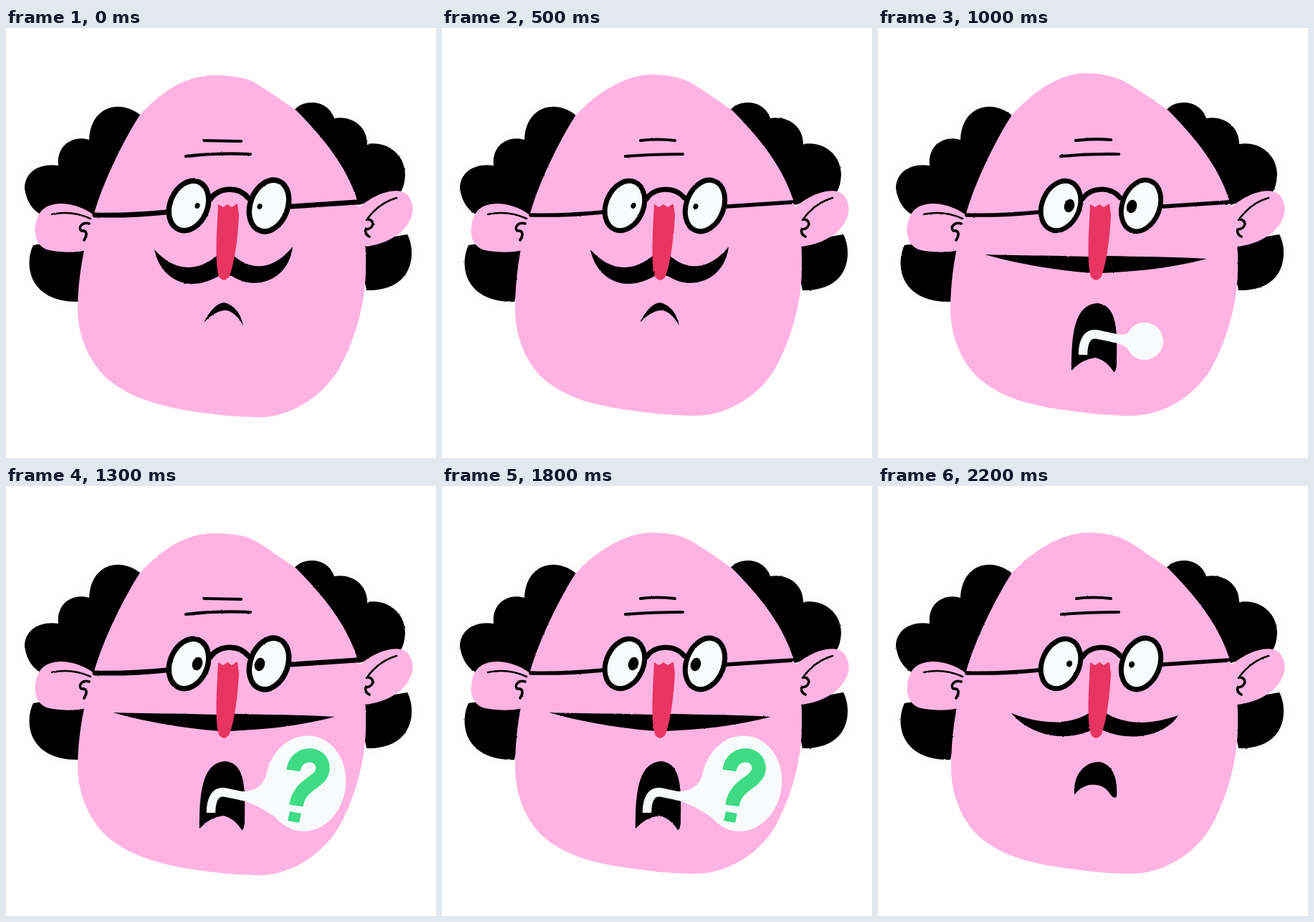
An HTML page for the animation above (2300 ms loop, 600 by 600 pixels).

```html
<!DOCTYPE html>
<html lang="en">
<head>
<meta charset="utf-8">
<title>Puzzled man</title>
<style>
  html, body { margin: 0; width: 100%; height: 100%; overflow: hidden; background: #fff; }
  svg { display: block; width: 100%; height: 100%; }
  .skin { fill: #ffb3e3; }
  .line { fill: none; stroke: #000; stroke-linecap: round; stroke-linejoin: round; }
  .hair { stroke: #fdfdfd; stroke-width: 16; paint-order: stroke; }
  .white { fill: #f8fbfb; }
</style>
</head>
<body>
<svg viewBox="0 0 600 600">
  <defs>
    <filter id="crayon" filterUnits="userSpaceOnUse" x="0" y="0" width="600" height="600" color-interpolation-filters="sRGB">
      <feTurbulence id="grain" type="fractalNoise" baseFrequency=".25" numOctaves="2"/>
      <feColorMatrix values="1 0 0 0 0  0 1 0 0 0  0 0 1 0 0  0 0 0 0 1" result="noise"/>
      <feDisplacementMap in="SourceGraphic" in2="noise" scale="1.8" xChannelSelector="R" yChannelSelector="G"/>
    </filter>
  </defs>
  <g filter="url(#crayon)">
    <g id="hair">
      <path class="hair" d="M187 121C160 99 118 108 116 156C94 149 70 163 73 192C48 188 26 200 26 224Q30 250 48 260Q85 240 125 264L200 200Z"/>
      <path class="hair" d="M38 303C25 330 31 383 102 382L125 290Z"/>
    </g>
    <path class="hair" d="M402 115C415 98 450 100 458 126C480 122 504 135 504 162C530 157 557 175 557 205Q556 222 550 230L492 247L400 180Z"/>
    <path class="hair" d="M560 288C572 310 572 367 503 366L490 300Z"/>
    <path id="head" class="skin"/>
    <path class="skin" d="M124 262C95 240 55 239 45 262C35 285 42 306 60 310C80 314 100 313 113 310Z"/>
    <path class="skin" d="M492 251C515 230 550 219 562 235C573 252 567 270 550 286C535 297 520 303 500 305Z"/>
    <path class="line" stroke-width="2.6" d="M64 260Q92 254 118 266M503 268Q520 244 545 237"/>
    <path class="line" stroke-width="3.6" d="M116 273C107 270 100 278 105 283C113 282 114 288 109 296M505 267C515 268 514 280 502 281Q500 287 507 291"/>
    <path id="wrinkles" class="line" stroke-width="4.2"/>
    <g id="glasses" class="line">
      <ellipse class="white" cx="255" cy="248" rx="26" ry="36" transform="rotate(23 255 248)"/>
      <ellipse class="white" cx="367" cy="248" rx="26" ry="37" transform="rotate(21 367 248)"/>
      <path d="M285 239C296 222 324 220 338 237"/>
    </g>
    <path id="temples" class="line" d="M124 261Q175 262 224 257M398 249L489 243"/>
    <ellipse id="pupilL" cx="267" cy="248" transform="rotate(18 267 248)"/>
    <ellipse id="pupilR" cx="354" cy="249" transform="rotate(18 354 249)"/>
    <path id="moustache"/>
    <path id="mouth"/>
    <path fill="#e83562" d="M296 246L303 250L309 246L315 250L323 245L325 262C323 300 318 330 312 346Q305 357 297 347C291 325 294 290 296 246Z"/>
  </g>
  <g id="bubble">
    <path fill="none" stroke="#f8fbfb" stroke-width="12.5" d="M286 456C286 434 294 426 305 427.500L332 433"/>
    <path id="tail" class="white"/>
    <ellipse id="blob" class="white"/>
    <g id="question">
      <path fill="none" stroke="#3fdb84" stroke-width="19.5" d="M401 397C405 368 443 370 442 395C440 415 409 415 405 446"/>
      <path fill="#3fdb84" d="M396 454L412 457L409 470L393 467Z"/>
    </g>
  </g>
</svg>
<script>
const STEP = 100, STEPS = 23;
// One letter per step: line boil, expression and bubble size.
const BOIL   = "ACBACBACBACBBACBACBACBB";
const MOOD   = "cccccccchoooooooooooooh";
const BUBBLE = "---------nsmllllllllms-";

const boils = {
  A: { top: [290, 66], left: 100, base: 543, pen: 7.5, arm: 6.8, hair: 0,
       wrinkles: "M276 157L328 158M251 179Q295 174 341 176" },
  B: { top: [295, 65], left: 102, base: 541, pen: 7, arm: 5.4, hair: -1,
       wrinkles: "M277 157Q300 154 325 157M256 179Q295 176 336 176" },
  C: { top: [291, 63], left: 101, base: 541, pen: 6.8, arm: 5.4, hair: -1,
       wrinkles: "M276 157Q300 154 325 156M255 179Q295 175 336 176" }
};

const moods = {
  c: { pupil: [3.5, 4],
       moustache: "M207 309C215 350 255 373 300 344L315 346C350 369 395 350 400 305C380 330 350 345 318 318L294 318C260 345 230 335 207 309Z",
       mouth: "M276 411Q289 385 304 383Q325 388 331 415Q318 393 304 394Q290 396 276 411Z" },
  h: { pupil: [4, 4.6],
       moustache: "M186 317C210 345 255 360 300 340L312 340C350 358 400 350 419 320C385 332 350 335 320 318L294 317C265 335 225 332 186 317Z",
       mouth: "M274 431C272 400 290 385 308 385C328 387 335 410 333 433Q330 438 324 430Q315 415 295 417Q282 420 274 431Z" },
  o: { pupil: [7, 9.5],
       moustache: "M149 316C190 328 245 338 298 342L312 342C360 340 410 335 459 322C410 319 360 319 320 318L294 319C245 317 200 318 149 316Z",
       mouth: "M270 478C270 430 273 385 307 384C335 388 334 425 333 470Q332 480 329 480Q318 463 303 460Q285 462 270 478Z" }
};

const bubbles = {
  n: { cx: 330, cy: 434, rx: 7, ry: 6, mark: 0 },
  s: { cx: 372, cy: 437, rx: 26, ry: 26, mark: 0 },
  m: { cx: 405, cy: 424, rx: 47, ry: 48, mark: .69, at: [403.5, 428] },
  l: { cx: 418, cy: 415, rx: 56, ry: 67, mark: 1, at: [422, 418] }
};

const $ = id => document.getElementById(id);
const set = (id, attrs) => {
  for (const name in attrs) $(id).setAttribute(name, attrs[name]);
};

function headPath({ top: [x, y], left, base }) {
  return `M${x} ${y}C${x - 40} ${y} 216 90 187 121C165 155 135 215 122 262` +
    `C108 305 ${left} 350 ${left} 395C${left + 1} 430 115 465 142 490` +
    `C167 511 200 525 260 ${base - 8}C300 ${base - 2} 330 ${base} 355 ${base}` +
    `C400 ${base} 445 510 465 475C490 430 503 375 502 330` +
    `C503 295 497 262 490 240C478 203 455 165 405 115` +
    `C375 94 350 76 335 71Q315 ${y} ${x} ${y}Z`;
}

function tailPath({ cx, cy, rx, ry }) {
  if (rx < 12) return "";
  return `M325 426Q${cx - rx * .98} 430 ${cx - rx * .9} ${cy - ry * .45}` +
    `L${cx - rx * .45} ${cy + ry * .88}Q348 441 325 438Z`;
}

function drawBubble(bubble) {
  set("bubble", { display: bubble ? "inline" : "none" });
  if (!bubble) return;
  const { cx, cy, rx, ry, mark, at } = bubble;
  set("blob", { cx, cy, rx, ry, transform: `rotate(8 ${cx} ${cy})` });
  set("tail", { d: tailPath(bubble) });
  set("question", { display: mark ? "inline" : "none" });
  if (mark) set("question", { transform: `translate(${at}) scale(${mark}) translate(-422 -418)` });
}

function draw(step) {
  const boil = boils[BOIL[step]], mood = moods[MOOD[step]];
  const [rx, ry] = mood.pupil;
  set("grain", { seed: BOIL.charCodeAt(step) });
  set("hair", { transform: `translate(${boil.hair} 0)` });
  set("head", { d: headPath(boil) });
  set("wrinkles", { d: boil.wrinkles });
  set("glasses", { "stroke-width": boil.pen });
  set("temples", { "stroke-width": boil.arm });
  set("pupilL", { rx, ry });
  set("pupilR", { rx, ry });
  set("moustache", { d: mood.moustache });
  set("mouth", { d: mood.mouth });
  drawBubble(bubbles[BUBBLE[step]]);
}

const start = performance.now();
let shown = -1;
function tick() {
  const step = Math.floor((performance.now() - start) / STEP) % STEPS;
  if (step !== shown) draw(shown = step);
  requestAnimationFrame(tick);
}
tick();
</script>
</body>
</html>
```
